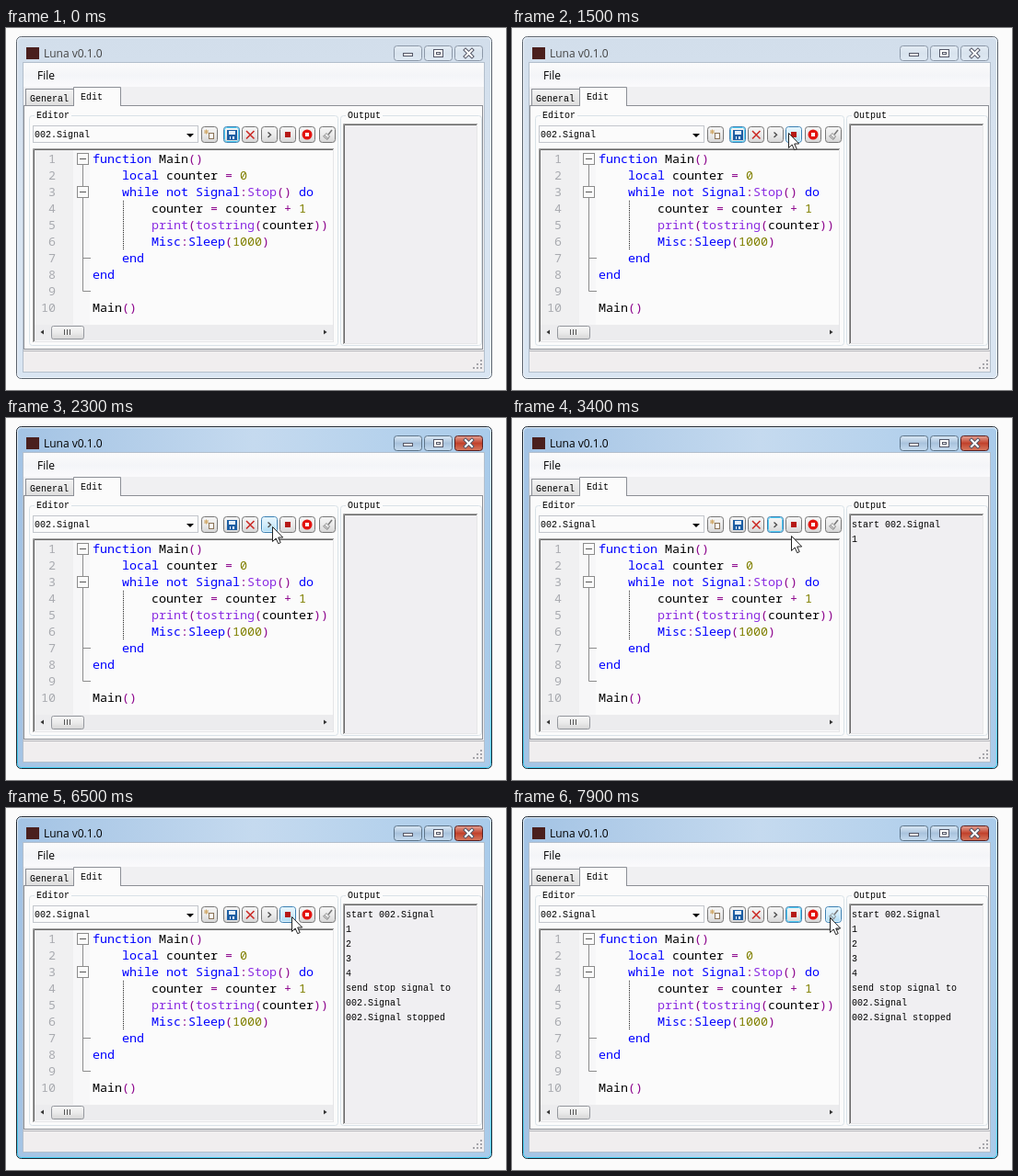
Animation of 543 by 394 pixels, one loop 8 s. Source, as an HTML page:

```html
<!DOCTYPE html>
<html lang="en">
<head>
<meta charset="utf-8">
<title>Script editor</title>
<style>
html, body { margin: 0; width: 100%; height: 100%; overflow: hidden; background: #fbfbfb; }
svg { display: block; }
text { white-space: pre; }
.ui { font: 12px "Open Sans", sans-serif; }
.small { font: 10px "Liberation Mono", monospace; }
.code { font: 13.333px "Noto Sans Mono", monospace; }
.frame { fill: url(#idle); stroke: #5b636d; }
.glow { fill: none; stroke: #eef4fb; }
.caption { fill: url(#captionIdle); stroke: #8c98a8; }
.title { fill: #444; }
.active .frame { fill: url(#lit); stroke: #1e2630; }
.active .glow { stroke: url(#edge); }
.active .caption { fill: url(#captionLit); stroke: #5d7489; }
.active .close { fill: url(#closeLit); stroke: #5a2020; }
.active .title { fill: #000; }
.face { fill: url(#face); stroke: #777; }
.ring { fill: none; stroke: none; }
.focus .face, .hot .face { stroke: #3c7fb1; }
.focus .ring { stroke: #52cdf4; }
.hot .face { fill: url(#hot); }
.hot .ring { stroke: #e2f5fe; }
</style>
</head>
<body>
<svg id="stage" width="543" height="394"></svg>
<script>
const stage = document.getElementById('stage');

const gradient = (id, colors, horizontal) =>
  `<linearGradient id="${id}" x2="${horizontal ? 1 : 0}" y2="${horizontal ? 0 : 1}">` +
  colors.map((c, i) => `<stop offset="${i / (colors.length - 1)}" stop-color="${c}"/>`).join('') +
  '</linearGradient>';
const box = (x, y, w, h, fill, stroke, extra = '') =>
  `<rect x="${x}" y="${y}" width="${w}" height="${h}" fill="${fill}" stroke="${stroke || 'none'}" ${extra}/>`;
const styled = (cls, x, y, w, h, rx = 3) =>
  `<rect class="${cls}" x="${x}" y="${y}" width="${w}" height="${h}" rx="${rx}"/>`;
const line = (d, color, extra = '') => `<path d="${d}" fill="none" stroke="${color}" ${extra}/>`;
const shape = (d, color) => `<path d="${d}" fill="${color}"/>`;
const label = (cls, x, y, content, fill = '#000') =>
  `<text class="${cls}" x="${x}" y="${y}" fill="${fill}">${content}</text>`;
const sunken = (x, y, w, h, fill) => box(x + .5, y + .5, w - 1, h - 1, fill, '#e6e6e8') +
  line(`M${x + .5} ${y + h}V${y + .5}H${x + w}`, '#a0a0a0') +
  line(`M${x + 1.5} ${y + h - 1}V${y + 1.5}H${x + w - 1}`, '#696969');

const defs = '<defs>' +
  gradient('idle', ['#d2deeb', '#d9e5f2', '#d9e5f2']) +
  gradient('lit', ['#a3c3e4', '#c5daef', '#a9cbea'], true) +
  gradient('edge', ['#e8f3fc', '#b4e4f8', '#42d0f4']) +
  gradient('captionIdle', ['#e4ecf4', '#d8e3ee', '#dfe9f3']) +
  gradient('captionLit', ['#dce9f5', '#a9c3dd', '#c6dcf0']) +
  gradient('closeLit', ['#e5a597', '#c1422c', '#d77a60']) +
  gradient('menu', ['#fbfbfb', '#f4f5f8', '#fafafc']) +
  gradient('face', ['#f5f5f5', '#ebebeb', '#d6d6d6']) +
  gradient('hot', ['#eaf6fd', '#d2edfc', '#a9d9f3']) +
  gradient('tab', ['#f4f4f4', '#dedede']) + '</defs>';

function windowFrame() {
  const caption = (x, cls) => styled('caption ' + cls, x + .5, 19.5, 30, 16);
  const cross = 'M499 24l7 7m0-7l-7 7';
  return styled('frame', 11.5, 9.5, 516, 372, 5) +
    styled('glow', 12.5, 10.5, 514, 370, 4) +
    box(18.5, 37.5, 501, 337, '#f0f0f2', '#b3bfcc') +
    box(22, 21, 14, 13, '#4a1f1d') +
    label('ui title', 41, 32, 'Luna v0.1.0', '') +
    caption(421, '') + caption(454, '') + caption(487, 'close') +
    box(431.5, 27.5, 10, 3, '#fff', '#535666') +
    box(464.5, 23.5, 10, 8, '#fff', '#535666') + box(467.5, 26.5, 4, 2, 'none', '#535666') +
    line(cross, '#535666', 'stroke-width="4" stroke-linecap="square"') +
    line(cross, '#fff', 'stroke-width="2" stroke-linecap="square"') +
    box(19, 38, 500, 26, 'url(#menu)') + label('ui', 34, 56, 'File');
}

function panels() {
  const group = (x, w, name) => box(x + .5, 95.5, w, 250, 'none', '#d9e2e8', 'rx="3"') +
    box(x + 6, 90, 40, 10, '#fbfbfb') + label('small', x + 8, 98, name);
  let grip = '';
  for (let row = 0; row < 3; row++)
    for (let col = 2 - row; col < 3; col++) grip += box(507 + col * 4, 361 + row * 4, 2, 2, '#a5a5aa');
  return box(19.5, 84.5, 498, 265, '#fbfbfb', '#8c8f96') +
    box(21.5, 66.5, 52, 18, 'url(#tab)', '#8c8f96') +
    line('M73.5 85V64.5H124.5V85', '#8c8f96', 'style="fill:#fbfbfb"') +
    label('small', 26, 80, 'General') + label('small', 81, 78, 'Edit') +
    group(25, 335, 'Editor') + group(363, 153, 'Output') +
    sunken(366, 104, 146, 240, '#f0eff2') +
    box(19, 352, 500, 22, '#f0eeef') + line('M19 351.5H519', '#b4b4b8') + grip +
    box(29.5, 106.5, 179, 18, '#fbfbfb', '#c3c6cc') +
    label('small', 31, 119, '002.Signal') + shape('M196 115h8l-4 4z', '#000');
}

const buttons = [
  [212, box(8.5, 7.5, 5, 6, '#fff', '#8a7358') + line('M3 6h5m-2.5-2.5v5m-2-4.5l4 4m0-4l-4 4', '#d0a868')],
  [236, box(4, 4, 11, 11, '#1d5ea3') + box(6, 5, 7, 4, '#e6f0fa') + box(7, 11, 5, 3, '#e6f0fa') + box(8, 11, 2, 3, '#1d5ea3')],
  [256, line('M5 5l8.5 8.5m0-8.5L5 13.5', '#cb2b26', 'stroke-width="1.6"')],
  [277, line('M7.5 6.5l3 2.8l-3 2.8', '#4d4d4d', 'stroke-width="1.4"')],
  [297, box(6, 6, 6, 6, '#b51a17')],
  [318, '<circle cx="9" cy="9" r="5.5" fill="#e3130f"/>' + box(7, 7, 4, 4, '#fff')],
  [340, line('M14 4l-4 5', '#777', 'stroke-width="1.5"') + line('M8 7.5l3.5 3.5l-2.5 3.5l-4.5-3.5zM6 10l4 3.5', '#8b8b8b')]
];
const toolbar = () => buttons.map(([x, icon]) =>
  `<g class="button" transform="translate(${x} 107)">` +
  styled('face', .5, .5, 17, 17) + styled('ring', 1.5, 1.5, 15, 15, 2) + icon + '</g>').join('');

const source = [
  'function Main()',
  '    local counter = 0',
  '    while not Signal:Stop() do',
  '        counter = counter + 1',
  '        print(tostring(counter))',
  '        Misc:Sleep(1000)',
  '    end',
  'end',
  '',
  'Main()'
];
const syntax = [
  [/^(function|local|while|not|do|end|Signal|Misc|Sleep)$/, '#0000ff'],
  [/^(Stop|print|tostring)$/, '#8a2be2'],
  [/^\d+$/, '#808000'],
  [/^\w+$/, '#000'],
  [/./, '#8b008b']
];
const highlight = text => text.replace(/\w+|[^\w\s]/g, token =>
  `<tspan fill="${syntax.find(([rule]) => rule.test(token))[1]}">${token}</tspan>`);

function editor() {
  const fold = y => box(77.5, y - 5.5, 12, 12, '#fbfbfb', '#8c8c8c') + line(`M80 ${y + .5}h7`, '#555');
  const rows = source.map((text, i) => {
    const y = 147 + 18 * i, code = text.trimStart(), number = String(i + 1);
    return label('code', 54 - 8 * number.length, y, number, '#a9abb0') +
      label('code', 94 + 8 * (text.length - code.length), y, highlight(code));
  }).join('');
  return sunken(29, 131, 327, 211, '#fbfbfb') +
    box(31, 133, 42, 190, '#f0f0f1') + box(73, 133, 18, 190, '#f7f7f8') +
    line('M83.5 149V286.5H92M83.5 250.5H92', '#8c8c8c') + fold(142) + fold(178) +
    line('M127.5 188V241', '#222', 'stroke-dasharray="1 1"') + rows +
    box(31, 323, 324, 17, '#ececee') +
    box(49.5, 324.5, 35, 14, 'url(#face)', '#94979d', 'rx="2"') +
    line('M63.5 328v6m3-6v6m3-6v6', '#555') +
    shape('M41 328.5v5l-3.5-2.5z', '#333') + shape('M345 328.5v5l3.5-2.5z', '#333');
}

const log = [
  [2400, 'start 002.Signal'], [2400, '1'], [3700, '2'], [4700, '3'], [5500, '4'],
  [5600, 'send stop signal to'], [5600, '002.Signal'], [6500, '002.Signal stopped']
];
const output = () => log.map(([, text], i) =>
  `<g class="entry">${label('small', 369, 119 + 16 * i, text)}</g>`).join('');

stage.innerHTML = defs + windowFrame() + panels() + toolbar() + editor() + output() +
  '<path id="pointer" d="M.5.5V16.5L4.2 13L6.7 18.7L9.2 17.6L6.7 12H11.7Z" fill="#fff" stroke="#222"/>';

const pointer = document.getElementById('pointer');
const buttonNodes = stage.querySelectorAll('.button');
const entryNodes = stage.querySelectorAll('.entry');

// Pointer path: time, x, y
const path = [
  [600, 531, 65], [700, 478, 74], [800, 415, 90], [900, 355, 105], [1000, 328, 110],
  [1200, 315, 114], [1400, 303, 113], [1800, 291, 118], [2000, 289, 118], [2800, 289, 118],
  [3200, 302, 129], [3300, 302, 129], [3500, 304, 126], [3600, 304, 126], [4100, 305, 119],
  [6400, 305, 119], [6500, 310, 118], [6600, 309, 119], [6700, 309, 119], [7000, 291, 122],
  [7200, 292, 124], [7600, 328, 124], [7900, 345, 119], [8000, 345, 119]
];
function pointerAt(time) {
  const next = path.findIndex(key => key[0] > time);
  if (next < 1) return [-50, -50];
  const a = path[next - 1], b = path[next], k = (time - a[0]) / (b[0] - a[0]);
  return [1, 2].map(i => Math.round(a[i] + (b[i] - a[i]) * k));
}

function draw(now) {
  const time = Math.floor(now % 8000 / 100) * 100;
  const [x, y] = pointerAt(time);
  const focused = time < 2300 ? 1 : time < 5600 ? 3 : 4;
  stage.classList.toggle('active', time >= 2300);
  pointer.setAttribute('transform', `translate(${x} ${y})`);
  buttonNodes.forEach((node, i) => {
    const left = buttons[i][0];
    node.classList.toggle('hot', x >= left && x < left + 18 && y >= 107 && y < 125);
    node.classList.toggle('focus', i === focused && time !== 2300);
  });
  entryNodes.forEach((node, i) => node.setAttribute('visibility', time >= log[i][0] ? 'visible' : 'hidden'));
}

const start = performance.now();
function tick() {
  draw(performance.now() - start);
  requestAnimationFrame(tick);
}
tick();
</script>
</body>
</html>
```
